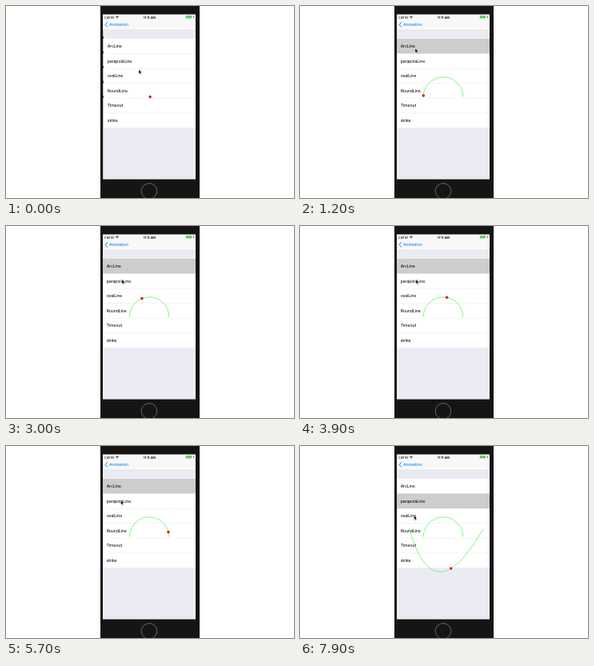
Animation, 360 px wide and 240 px high, one loop 8000 ms. Source, as an HTML page:

```html
<!DOCTYPE html>
<html lang="en">
<head>
<meta charset="utf-8">
<title>Path animations</title>
<style>
html, body { margin: 0; width: 100%; height: 100%; overflow: hidden; background: #fff; }
svg { display: block; width: 100vw; height: 100vh; }
text { font: 17px Inter, "Liberation Sans", sans-serif; letter-spacing: -.42px; }
.status { font-size: 12.4px; letter-spacing: 0; }
.time { font-weight: 600; }
.curve { fill: none; stroke: #48f548; stroke-width: 2.2; }
</style>
</head>
<body>
<svg viewBox="0 0 360 240">
  <rect x="118" width="124" height="240" fill="#151515"/>
  <circle cx="179" cy="231.4" r="9.8" fill="#151515" stroke="#707070" stroke-width=".9"/>
  <clipPath id="screen"><rect width="375" height="666"/></clipPath>
  <!-- Screen, measured in 375 x 667 points -->
  <g transform="translate(121 10.4) scale(.3093)" clip-path="url(#screen)">
    <rect width="375" height="667" fill="#fff"/>
    <g id="remnants" fill="#333"></g>
    <g id="page">
      <rect y="64" width="375" height="603" fill="#ebebf4"/>
      <g id="rows"></g>
      <path id="arc" class="curve" d="M107.5 333.5A80 80 0 0 1 267.5 333.5"/>
      <path id="parabola" class="curve" d="M350 300Q150 650 50 300"/>
      <circle id="dot" r="5.6" fill="#e0101a"/>
    </g>
    <rect width="375" height="64" fill="#f8f8f8"/>
    <path d="M0 64H375" stroke="#b5b5b8" stroke-width="1"/>
    <text class="status" x="6" y="17">Carrier</text>
    <path d="M52 10.5Q58 5 64 10.5M54.5 13Q58 9.5 61.5 13M57 15.5H59" fill="none" stroke="#000" stroke-width="2.2"/>
    <text class="status time" x="188.5" y="17" text-anchor="middle">11:11 AM</text>
    <rect x="336" y="6" width="23" height="9.5" rx="2" fill="#4cd964" stroke="#8a8a8a" stroke-width=".8"/>
    <path d="M361 9v4M368 5l-4 6h3l-2 6 5-7h-3z" fill="#222"/>
    <path d="M19 31.5L10 42L19 52.5" fill="none" stroke="#007aff" stroke-width="3"/>
    <text x="26" y="48.5" fill="#007aff">Animation</text>
  </g>
  <path id="cursor" d="M0 0V5.3L1.3 4.2L2.2 6.2L3.1 5.8L2.2 3.8H3.9Z" fill="#000" stroke="#fff" stroke-width=".4"/>
</svg>
<script>
const LOOP = 8000, STEP = 100, MOVE_TIME = 5000;
const ARC_START = 1100, PARABOLA_START = 6100, TAP_LEAD = 100;
const TOP = 99, ROW = 60;
const labels = ['ArcLine', 'parapolaLine', 'ovalLine', 'RoundLine', 'Timeout', 'strike'];
const $ = id => document.getElementById(id);

// time, x, y of the pointer tip
const pointer = [
  [0, 166, 79.5], [200, 165, 78.5], [900, 144, 53], [1500, 144, 53], [2200, 144.5, 64],
  [2600, 145, 67], [3900, 145, 67], [5700, 143.5, 68], [6900, 144, 68],
  [7700, 142.5, 87], [8000, 142.5, 87]
];

$('rows').innerHTML = labels.map((label, i) => {
  const y = TOP + i * ROW;
  return `<rect y="${y}" width="375" height="${ROW}" fill="#fff"/>
    <text x="15" y="${y + 36}">${label}</text>`;
}).join('') + labels.map((_, i) =>
  `<path d="M${i < 5 ? 15 : 0} ${TOP + (i + 1) * ROW}H375" stroke="#c8c7cc" stroke-width=".6"/>`).join('');
const cells = $('rows').querySelectorAll('rect');

$('remnants').innerHTML = '<rect y="64" width="4" height="603" fill="#c4c4c8"/>' +
  labels.slice(1).map((_, i) => `<rect y="${89 + i * ROW}" width="3" height="9"/>`).join('');

const show = (id, on) => $(id).setAttribute('visibility', on ? 'visible' : 'hidden');

function pointerAt(t) {
  const i = pointer.findIndex(p => p[0] > t);
  const [t0, x0, y0] = pointer[i - 1], [t1, x1, y1] = pointer[i];
  const k = (t - t0) / (t1 - t0), e = k * k * (3 - 2 * k);
  return [x0 + (x1 - x0) * e, y0 + (y1 - y0) * e];
}

function dotAt(t) {
  if (t < ARC_START) return [187.5, 333.5];
  if (t < PARABOLA_START) {
    const a = Math.PI * (t - ARC_START) / MOVE_TIME;
    return [187.5 - 80 * Math.cos(a), 333.5 - 80 * Math.sin(a)];
  }
  const u = (t - PARABOLA_START) / MOVE_TIME, v = 1 - u;
  return [350 * v * v + 300 * u * v + 50 * u * u, 300 + 700 * u * v];
}

function draw(ms) {
  const t = Math.floor(ms % LOOP / STEP) * STEP;
  const slide = Math.max(0, 3.6 - t * .024);
  $('page').setAttribute('transform', `translate(${slide} 0)`);
  show('remnants', slide > 0);

  const selected = t < ARC_START - TAP_LEAD ? -1 : t < PARABOLA_START - TAP_LEAD ? 0 : 1;
  cells.forEach((cell, i) => cell.setAttribute('fill', i === selected ? '#cdcdcd' : '#fff'));

  show('arc', t >= ARC_START);
  show('parabola', t >= PARABOLA_START);
  const [x, y] = dotAt(t);
  $('dot').setAttribute('cx', x);
  $('dot').setAttribute('cy', y);
  $('cursor').setAttribute('transform', `translate(${pointerAt(t)})`);
}

const start = performance.now();
function tick() {
  draw(performance.now() - start);
  requestAnimationFrame(tick);
}
tick();
</script>
</body>
</html>
```
